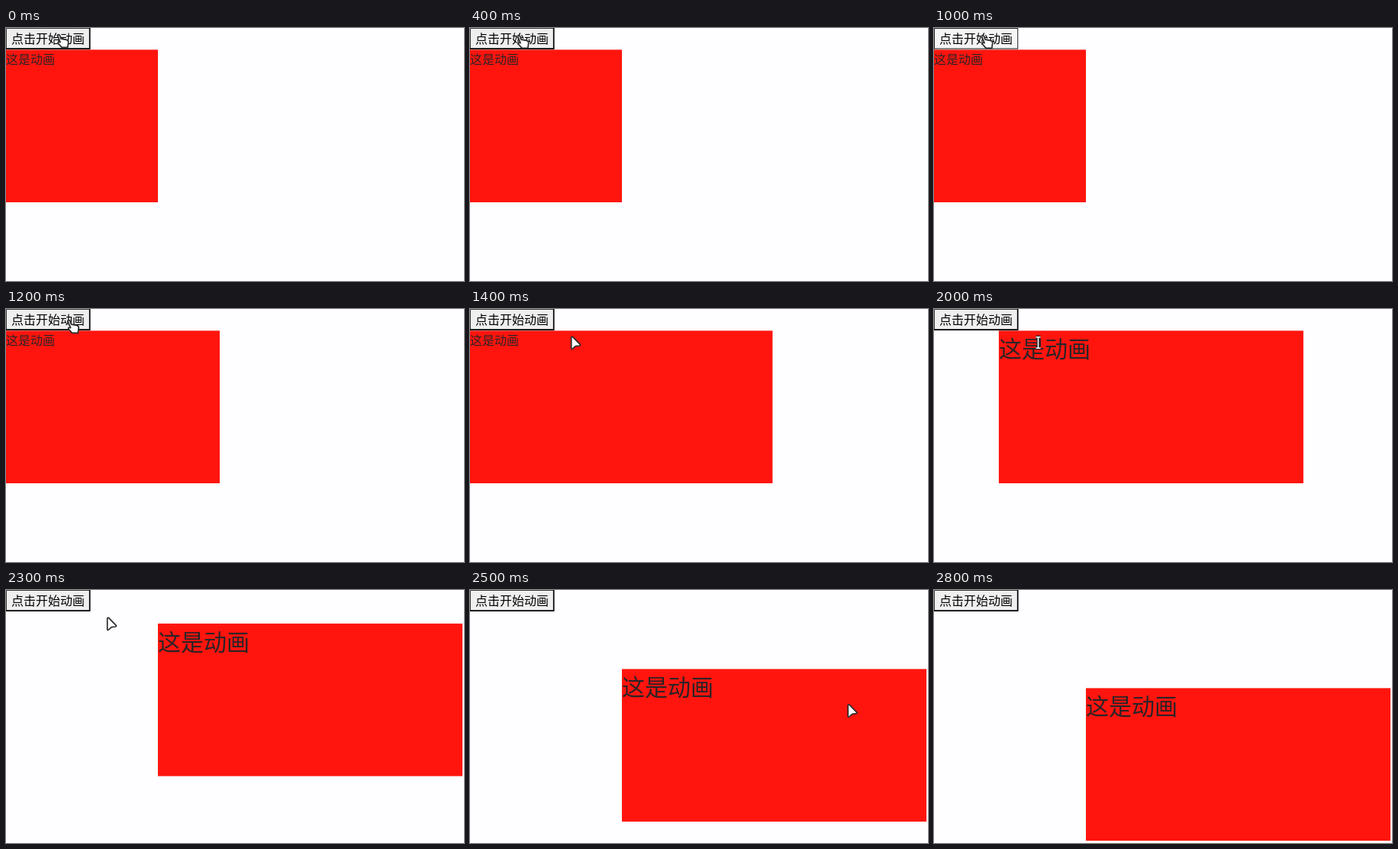
An HTML page for the animation above (3800 ms loop, 600x331 px).

```html
<!DOCTYPE html>
<html lang="zh-CN">
<head>
<meta charset="utf-8">
<style>
  html, body { margin: 0; width: 100%; height: 100%; overflow: hidden; background: #fefdff; }
  svg { display: block; width: 600px; height: 331px; }
  text { font-family: "Noto Sans CJK SC", "Noto Sans CJK JP", "Noto Sans CJK", sans-serif; }
  #cursor path { fill: #fff; stroke: #2b2b2b; stroke-width: 1.7; stroke-linejoin: round; }
</style>
</head>
<body>
<svg viewBox="0 0 600 331">
  <rect id="face" width="110" height="28"/>
  <path id="topLeft" d="M.5 28V.5H110" fill="none"/>
  <path id="bottomRight" d="M0 27.2H109.7V0" fill="none"/>
  <text x="7" y="20" font-size="16">点击开始动画</text>
  <g id="box">
    <rect id="panel" y="28.4" height="199.6" fill="#ff150e"/>
    <text id="label" fill="#2a2327">这是动画</text>
  </g>
  <g id="cursor">
    <path id="hand" d="M.8 1.6q1.8-2 3.2.3l1.6 4.2 7 1.3q2.8.6 2.6 3.4l-.9 6.6H6.6l-4.8-5.4q-.7-2 1.5-1.7l1.3.3z"/>
    <path id="arrow" d="M1.2 2.4V16q.3 1.8 1.9.6l3.6-3.2 5.2-.7q1.8-.5.6-1.9L3.2 1.3Q1.4.2 1.2 2.4Z"/>
    <g id="beam" fill="none">
      <path d="M2 1.5H8M5 1.5V16M2 16H8" style="stroke:#222;stroke-width:4"/>
      <path d="M2 1.5H8M5 1.5V16M2 16H8" style="stroke:#fff;stroke-width:1.6"/>
    </g>
  </g>
</svg>
<script>
const LOOP = 3800, STEP = 100, LAST = 2800;
const $ = id => document.getElementById(id);
const set = (id, attrs) => {
  for (const name in attrs) $(id).setAttribute(name, attrs[name]);
};

// Cosine ease between two values over a time span
const swing = (t, start, end, from, to) => {
  const p = Math.min(1, Math.max(0, (t - start) / (end - start)));
  return from + (to - from) * (0.5 - Math.cos(Math.PI * p) / 2);
};

// Pointer path: time, x, y
const path = [
  [0, 66.5, 8], [100, 63, 8], [200, 57, 9], [300, 59, 9], [400, 61.5, 9],
  [1100, 61.5, 9], [1200, 80, 14], [1300, 120, 30], [1400, 131.5, 35.3],
  [2300, 131.5, 35.3], [2500, 494, 149], [2600, 640, 195], [LOOP, 640, 195]
];

function pointerAt(t) {
  const i = path.findIndex(key => key[0] > t);
  const [t0, x0, y0] = path[i - 1], [t1, x1, y1] = path[i];
  const p = (t - t0) / (t1 - t0);
  return [x0 + (x1 - x0) * p, y0 + (y1 - y0) * p];
}

function draw(t) {
  const width = swing(t, 1020, 1430, 199, 399);
  const size = swing(t, 1430, 1850, 16, 30);
  const left = swing(t, 1855, 2175, 0, 199);
  const top = swing(t, 2174, 2663, 0, 100);
  set('box', { transform: `translate(${left} ${top})` });
  set('panel', { width });
  set('label', { 'font-size': size, y: 28.5 + size * 1.16 });

  const pressed = t === 1000;
  set('face', { fill: pressed ? '#f5f5f5' : '#efefef' });
  set('topLeft', { stroke: pressed ? '#222' : '#3c3c3c', 'stroke-width': 1 });
  set('bottomRight', { stroke: pressed ? '#444' : '#000', 'stroke-width': pressed ? 1.2 : 1.7 });

  const [x, y] = pointerAt(t);
  const overButton = x < 105 && y < 25;
  const overText = x > left && x < left + 4 * size && y > 28 + top && y < 28 + top + 1.4 * size;
  const shape = overButton ? 'hand' : overText ? 'beam' : 'arrow';
  set('cursor', { transform: `translate(${x} ${y})` });
  for (const id of ['hand', 'arrow', 'beam']) $(id).style.display = id === shape ? '' : 'none';
}

function tick() {
  const t = performance.now() % LOOP;
  draw(Math.min(LAST, Math.floor(t / STEP) * STEP));
  requestAnimationFrame(tick);
}
tick();
</script>
</body>
</html>
```
